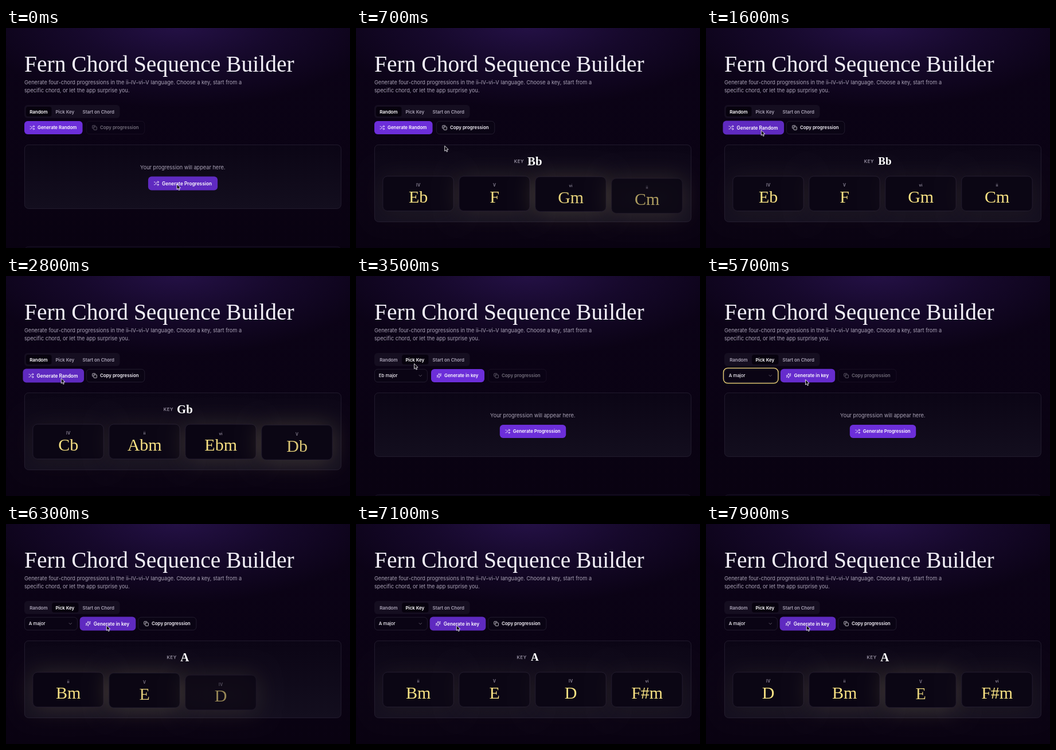
An HTML page with a canvas for the animation above (8000 ms loop, 600 by 383 pixels).

```html
<!DOCTYPE html>
<html lang="en">
<head>
<meta charset="utf-8">
<title>Fern Chord Sequence Builder</title>
<style>
html, body { margin: 0; width: 100%; height: 100%; overflow: hidden; background: #0a0212; }
canvas { display: block; width: 600px; height: 383px; }
</style>
</head>
<body>
<canvas id="stage"></canvas>
<script>
const W = 600, H = 383, LOOP = 8000;
const canvas = document.getElementById('stage');
const ctx = canvas.getContext('2d');
const dpr = window.devicePixelRatio || 1;
canvas.width = W * dpr;
canvas.height = H * dpr;

const SANS = 'Inter, "Open Sans", sans-serif';
const SERIF = '"Liberation Serif", "Times New Roman", serif';
const UI = '600 7.9px ' + SANS, ITEM = '500 7.85px ' + SANS, BODY = '400 9.19px ' + SANS;
const GOLD = '#fae384', MUTED = '#aaa3b6', LINE = '#292235', DARK = '#0a0414';

const icons = {
  shuffle: 'm18 14 4 4-4 4m0-20 4 4-4 4M2 18h1.973a4 4 0 0 0 3.3-1.7l5.454-8.6a4 4 0 0 1 3.3-1.7H22' +
    'M2 6h1.972a4 4 0 0 1 3.6 2.2M22 18h-6.041a4 4 0 0 1-3.3-1.8l-.359-.45',
  copy: 'M10 8h10a2 2 0 0 1 2 2v10a2 2 0 0 1-2 2H10a2 2 0 0 1-2-2V10a2 2 0 0 1 2-2z' +
    'M4 16c-1.1 0-2-.9-2-2V4c0-1.1.9-2 2-2h10c1.1 0 2 .9 2 2',
  spark: 'M9.9 15.5A2 2 0 0 0 8.5 14.1L2.4 12.5a.5.5 0 0 1 0-1L8.5 9.9A2 2 0 0 0 9.9 8.5L11.5 2.4' +
    'a.5.5 0 0 1 1 0L14.1 8.5A2 2 0 0 0 15.5 9.9L21.6 11.5a.5.5 0 0 1 0 1L15.5 14.1' +
    'a2 2 0 0 0-1.4 1.4L12.5 21.6a.5.5 0 0 1-1 0zM20 3v4M22 5h-4M4 17v2M5 18H3',
  chevron: 'm6 9 6 6 6-6',
  check: 'M20 6 9 17l-5-5'
};
for (const k in icons) icons[k] = new Path2D(icons[k]);

// Time line
const PICK = 3250, OPEN = 3800, CLOSE = 5000;
const rounds = [
  { at: 200, end: 2215, key: 'Bb', chords: ['IV Eb', 'V F', 'vi Gm', 'ii Cm'] },
  { at: 2215, end: PICK, key: 'Gb', chords: ['IV Cb', 'ii Abm', 'vi Ebm', 'V Db'] },
  { at: 5950, end: 7410, key: 'A', chords: ['ii Bm', 'V E', 'IV D', 'vi F#m'] },
  { at: 7410, end: LOOP, key: 'A', chords: ['IV D', 'ii Bm', 'V E', 'vi F#m'], kept: 3 }
];
const keys = ['C', 'G', 'D', 'A', 'E', 'B', 'F#', 'F', 'Bb', 'Eb', 'Ab'];
const path = [
  [0, 298, 272], [250, 298, 272], [950, 96.3, 178], [2850, 96.3, 178], [3150, 103, 147],
  [3400, 103, 147], [3700, 97.5, 168.6], [4300, 97.5, 168.6], [4850, 80, 254], [5100, 80, 254],
  [5650, 173.5, 180.4], [5700, 173.5, 180.4], [5850, 175.3, 176.4], [LOOP, 175.3, 176.4]
];

const clamp = v => Math.max(0, Math.min(1, v));
const easeOut = p => 1 - (1 - clamp(p)) ** 3;
const easeBoth = p => p * p * (3 - 2 * p);
const hover = (t, on, off) => easeOut((t - on) / 260) * (1 - easeOut((t - off) / 260));

function pointer(t) {
  const i = path.findIndex(p => p[0] > t);
  const [t0, x0, y0] = path[i - 1], [t1, x1, y1] = path[i];
  const p = easeBoth((t - t0) / (t1 - t0));
  return [x0 + (x1 - x0) * p, y0 + (y1 - y0) * p];
}

function box(x, y, w, h, r, fill, stroke, lw = 0.8) {
  ctx.beginPath();
  ctx.roundRect(x, y, w, h, r);
  if (fill) { ctx.fillStyle = fill; ctx.fill(); }
  if (stroke) { ctx.strokeStyle = stroke; ctx.lineWidth = lw; ctx.stroke(); }
}

function text(s, x, y, font, color, align = 'left', spacing = 0) {
  ctx.font = font;
  ctx.fillStyle = color;
  ctx.textAlign = align;
  ctx.letterSpacing = spacing + 'px';
  ctx.fillText(s, x, y);
}

function icon(name, x, y, color) {
  ctx.save();
  ctx.translate(x, y);
  ctx.scale(0.383, 0.383);
  ctx.lineWidth = 2;
  ctx.lineCap = ctx.lineJoin = 'round';
  ctx.strokeStyle = color;
  ctx.stroke(icons[name]);
  ctx.restore();
}

function scaled(cx, cy, k, draw) {
  ctx.save();
  ctx.translate(cx, cy);
  ctx.scale(k, k);
  ctx.translate(-cx, -cy);
  draw();
  ctx.restore();
}

function glow(color, blur, dy = 0) {
  ctx.shadowColor = color;
  ctx.shadowBlur = blur * dpr;
  ctx.shadowOffsetY = dy * dpr;
}

function primary(x, y, w, label, name, h) {
  const mix = (a, b) => Math.round(a + (b - a) * h);
  scaled(x + w / 2, y + 11.5, 1 + 0.05 * h, () => {
    box(x, y, w, 23, 5.7, `rgb(${mix(108, 95)},${mix(46, 42)},${mix(217, 192)})`);
    icon(name, x + 9.2, y + 6.9, '#fff');
    text(label, x + 23, y + 14.4, UI, '#fff');
  });
}

function copyButton(x, enabled) {
  ctx.globalAlpha = enabled ? 1 : 0.45;
  box(x, 162.3, 101.5, 22.4, 5.6, DARK, enabled ? LINE : '#33293f');
  icon('copy', x + 9.6, 168.9, '#f4f1f8');
  text('Copy progression', x + 23.6, 176.4, UI, '#f4f1f8');
  ctx.globalAlpha = 1;
}

function backdrop() {
  const g = ctx.createLinearGradient(0, 0, 0, H);
  g.addColorStop(0, '#0c0318');
  g.addColorStop(1, '#090211');
  ctx.fillStyle = g;
  ctx.fillRect(0, 0, W, H);
  ctx.save();
  ctx.translate(300, -8);
  ctx.scale(1, 0.42);
  const r = ctx.createRadialGradient(0, 0, 0, 0, 0, 350);
  r.addColorStop(0, 'rgba(74,38,142,.4)');
  r.addColorStop(0.5, 'rgba(74,38,142,.17)');
  r.addColorStop(1, 'rgba(74,38,142,0)');
  ctx.fillStyle = r;
  ctx.fillRect(-300, 0, W, 400);
  ctx.restore();
}

function header(pick) {
  text('Fern Chord Sequence Builder', 32, 75.5, '400 39.5px ' + SERIF, '#f5f2fa');
  text('Generate four-chord progressions in the ii–IV–vi–V language. Choose a key, start from a', 32, 98, BODY, MUTED);
  text('specific chord, or let the app surprise you.', 32, 111.7, BODY, MUTED);
  box(32, 134, 166.5, 22.8, 5.6, '#150e20');
  if (pick) box(80, 136.9, 46.5, 17.1, 4, '#07020e');
  else box(34.8, 136.9, 44.7, 17.1, 4, '#07020e');
  text('Random', 41.2, 148.5, UI, pick ? MUTED : '#fff');
  text('Pick Key', 86.5, 148.5, UI, pick ? '#fff' : MUTED);
  text('Start on Chord', 133.5, 148.5, UI, MUTED);
}

function controls(t, pick, ready) {
  if (!pick) {
    primary(32, 162, 101.5, 'Generate Random', 'shuffle', hover(t, 950, 2920));
    copyButton(140.3, ready);
    return;
  }
  box(32.4, 162.3, 92, 22.4, 5.6, DARK, LINE);
  if (t >= CLOSE && t < 5950) box(30.4, 160.4, 95.6, 26.2, 7.4, null, '#f7dd7b', 1.3);
  text((t < CLOSE ? 'Eb' : 'A') + ' major', 39.8, 176.4, ITEM, '#f4f1f8');
  icon('chevron', 107.7, 169, '#77707f');
  primary(131, 162, 93, 'Generate in key', 'spark', hover(t, 5650, LOOP + 1));
  copyButton(230.4, ready);
}

function panel(h) {
  const g = ctx.createLinearGradient(0, 203, 0, 203 + h);
  g.addColorStop(0, '#0b0515');
  g.addColorStop(1, '#130e1e');
  box(32.4, 203.4, 552, h, 7, g, LINE);
}

function card(i, chord, age) {
  const [numeral, name] = chord.split(' ');
  const p = easeOut(age / 450);
  const pulse = easeOut(age / 200) * (1 - easeBoth(clamp((age - 200) / 330)));
  const x = 46.8 + 133 * i, y = 258 + 12 * (1 - p), mid = x + 61.9;
  ctx.save();
  ctx.globalAlpha = p;
  glow(`rgba(236,222,140,${0.06 + 0.18 * pulse})`, 40, 2);
  box(x, y, 123.4, 60.5, 8, '#0b0614');
  glow('transparent', 0);
  box(x, y, 123.4, 60.5, 8, '#0b0614', LINE);
  text(numeral, mid, y + 18.4, '500 6.9px ' + SANS, MUTED, 'center', 0.35);
  text(name, mid, y + 46.2, '400 30px ' + SERIF, GOLD, 'center');
  ctx.restore();
}

function progression(round, t) {
  const age = t - round.at;
  panel(134);
  const font = '700 19px ' + SERIF;
  ctx.font = font;
  ctx.letterSpacing = '0px';
  const w = ctx.measureText(round.key).width;
  const left = 299.6 - (24.5 + w) / 2;
  text('KEY', left, 234.6, '500 7.8px ' + SANS, MUTED, 'left', 0.6);
  const pop = 0.1 * Math.sin(Math.PI * clamp(age / 900));
  scaled(left + 24.5 + w / 2, 232, 1 + pop, () =>
    text(round.key, left + 24.5, 238, font, '#fff'));
  round.chords.forEach((c, i) => {
    const own = i === round.kept ? 2000 : age - i * 120;
    if (own > 0) card(i, c, own);
  });
}

function emptyPanel(t) {
  panel(111);
  box(32.4, 380.4, 552, 60, 7, '#0c0616', '#1b1426');
  text('Your progression will appear here.', 308.3, 246, BODY, MUTED, 'center');
  primary(250.8, 259, 115.4, 'Generate Progression', 'shuffle', t < 200 ? 1 : 0);
}

function menu(t, [px, py]) {
  const inside = py > 190 && px > 33 && px < 125;
  const active = inside ? Math.floor((py - 189.8) / 18.4) : 9;
  ctx.save();
  ctx.globalAlpha = easeOut((t - OPEN) / 150);
  glow('rgba(0,0,0,.5)', 8, 3);
  box(32.4, 187.5, 92.6, 220, 5.6, DARK);
  glow('transparent', 0);
  box(32.4, 187.5, 92.6, 220, 5.6, DARK, LINE);
  keys.forEach((k, i) => {
    const y = 199 + 18.4 * i, on = i === active;
    const color = on ? '#1a1020' : '#f4f1f8';
    if (on) box(35.2, y - 9.2, 87.4, 18.4, 4, '#fde07c');
    if (i === 9) icon('check', 39, y - 4.5, color);
    text(k + ' major', 53.6, y + 2.9, ITEM, color);
  });
  ctx.restore();
}

function arrow([x, y]) {
  ctx.save();
  ctx.translate(x, y);
  ctx.beginPath();
  [[0, 0], [0, 9], [2.1, 7.2], [3.5, 10.4], [5, 9.7], [3.7, 6.6], [6.5, 6.4]]
    .forEach(p => ctx.lineTo(...p));
  ctx.closePath();
  ctx.lineJoin = 'round';
  ctx.fillStyle = '#08050c';
  ctx.fill();
  ctx.strokeStyle = '#f2f0f5';
  ctx.lineWidth = 0.9;
  ctx.stroke();
  ctx.restore();
}

function draw(t) {
  ctx.setTransform(dpr, 0, 0, dpr, 0, 0);
  const pick = t >= PICK;
  const round = rounds.find(r => t >= r.at && t < r.end);
  const tip = pointer(t);
  backdrop();
  header(pick);
  if (round) progression(round, t);
  else emptyPanel(t);
  controls(t, pick, !!round);
  if (t >= OPEN && t < CLOSE) menu(t, tip);
  arrow(tip);
}

const start = performance.now();
function tick() {
  draw((performance.now() - start) % LOOP);
  requestAnimationFrame(tick);
}
tick();
</script>
</body>
</html>
```
